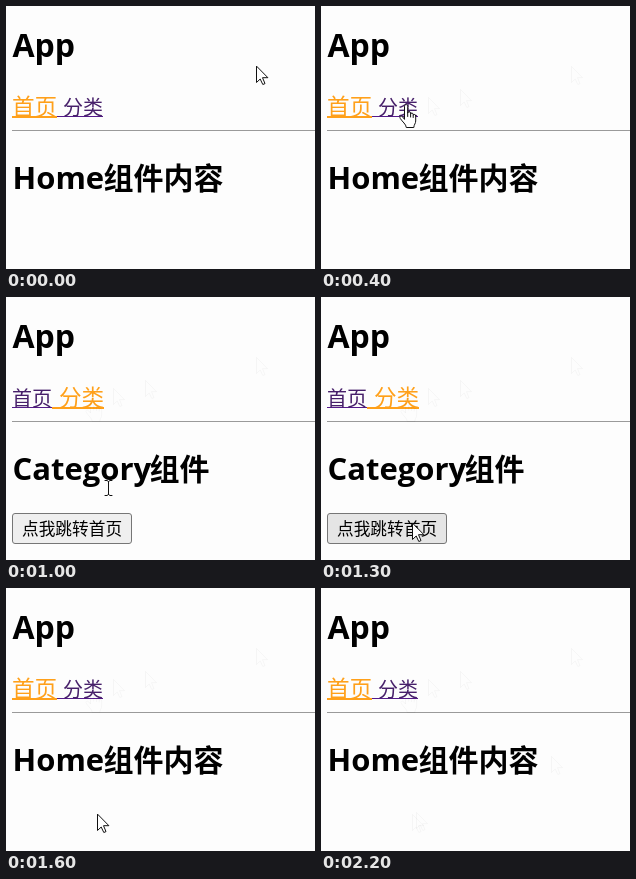
Animation of 309 by 263 pixels, one loop 2500 ms. Source, as an HTML page:

```html
<!DOCTYPE html>
<html lang="zh">
<head>
<meta charset="utf-8">
<style>
  html, body { margin: 0; width: 100%; height: 100%; overflow: hidden; background: #fdfdfd; }
  svg { display: block; }
  text { font-family: "Noto Sans CJK SC", "Noto Sans CJK", "Noto Sans CJK JP", sans-serif; }
  .latin { font: 700 31px "Open Sans", "Noto Sans", sans-serif; }
  .han { font-size: 30px; font-weight: 700; }
  .active { font-size: 22.6px; fill: #ffa01a; }
  .link { font-size: 20px; font-weight: 300; fill: #47206a; }
  .button { font-size: 16.7px; }
  .cursor { fill: #fff; stroke: #111; stroke-linejoin: round; stroke-linecap: round; }
  .trace { fill: none; stroke: #000; opacity: .03; }
  rect { shape-rendering: crispEdges; }
  #button { shape-rendering: auto; }
</style>
</head>
<body>
<svg width="309" height="263" viewBox="0 0 309 263">
  <defs>
    <path id="arrow" d="M.5 .5V16.5L4.2 13L6.8 18.5L9 17.6L6.5 11.7H11.5Z"/>
    <path id="hand" d="M5.5 15V2.2C5.5 .1 8.7 .1 8.7 2.2V9C8.9 7.2 11.6 7.4 11.6 9.2V10C11.9 8.5 14.2 8.8 14.2 10.5V11.2C14.8 10 16.7 10.3 16.7 12V17C16.7 19.5 15 20.5 14.8 23.5H7.3C7 20 3.5 18 1.3 14.5C0 12.5 2.2 11.2 3.6 12.8ZM8.7 9V12.5M11.6 10V13M14.2 11.2V13.5"/>
    <path id="beam" d="M-3 -7.5H-1L.5 -6.5L2 -7.5H4M.5 -6.5V6.5M-3 7.5H-1L.5 6.5L2 7.5H4"/>
  </defs>

  <text class="latin" x="6.5" y="51.3" style="font-size: 32px">App</text>
  <rect x="6" y="124" width="303" height="1" fill="#9a9a9a"/>

  <g id="home">
    <rect x="6" y="110" width="45" height="2" fill="#ffa01a"/>
    <rect x="51" y="110" width="46" height="1" fill="#551a8b"/>
    <text class="active" x="6" y="108.5">首页</text>
    <text class="link" x="57" y="108.5">分类</text>
    <text class="latin" x="6.5" y="183.3">Home</text>
    <text class="han" x="97.5" y="183.3">组件内容</text>
  </g>

  <g id="category">
    <rect x="6" y="110" width="40" height="1" fill="#551a8b"/>
    <rect x="46" y="110" width="52" height="2" fill="#ffa01a"/>
    <text class="link" x="6" y="108.5">首页</text>
    <text class="active" x="53" y="108.5">分类</text>
    <text class="latin" x="6.5" y="183.3">Category</text>
    <text class="han" x="143.5" y="183.3">组件</text>
    <rect id="button" x="6.5" y="216.5" width="119" height="30" rx="2.5" stroke="#767676"/>
    <text class="button" x="16" y="238">点我跳转首页</text>
  </g>

  <g id="traces"></g>
  <use id="cursor" class="cursor"/>
</svg>

<script>
const LOOP = 2500;
const $ = id => document.getElementById(id);

// Pointer stops: start time, shape, x, y
const stops = [
  [0, 'arrow', 250, 60], [100, 'arrow', 139, 83], [200, 'arrow', 107, 91],
  [300, 'hand', 80, 99], [400, 'hand', 78, 98],
  [700, 'hand', 80, 103], [800, 'arrow', 92, 135], [900, 'beam', 98, 165],
  [1000, 'beam', 102, 191], [1100, 'arrow', 97, 212],
  [1200, 'arrow', 93, 224], [1300, 'arrow', 91, 226],
  [1900, 'arrow', 95, 224], [2000, 'arrow', 230, 168],
  [2100, 'arrow', 284, 111], [2200, null, 0, 0]
];

// Faint marks left where the pointer has been: time, shape, x, y
const traces = [
  [100, 'arrow', 250, 60], [200, 'arrow', 139, 83], [300, 'arrow', 107, 91],
  [800, 'hand', 79, 101], [1900, 'arrow', 91, 226],
  [2000, 'arrow', 95, 224], [2100, 'arrow', 230, 168]
].map(([time, shape, x, y]) => {
  const node = document.createElementNS('http://www.w3.org/2000/svg', 'use');
  node.setAttribute('class', 'trace');
  place(node, shape, x, y);
  $('traces').append(node);
  return { time, node };
});

function place(node, shape, x, y) {
  node.setAttribute('href', '#' + shape);
  node.setAttribute('transform', `translate(${x} ${y})`);
}

function show(node, visible) {
  node.style.display = visible ? '' : 'none';
}

function draw(t) {
  const onCategory = t >= 600 && t < 1600;
  show($('home'), !onCategory);
  show($('category'), onCategory);
  $('button').setAttribute('fill', t >= 1500 ? '#f5f5f5' : t >= 1200 ? '#e5e5e5' : '#efefef');

  const [, shape, x, y] = stops.filter(s => s[0] <= t).pop();
  show($('cursor'), shape);
  if (shape) place($('cursor'), shape, x, y);
  traces.forEach(({ time, node }) => show(node, t >= time));
}

const start = performance.now();
function tick() {
  draw((performance.now() - start) % LOOP);
  requestAnimationFrame(tick);
}
tick();
</script>
</body>
</html>
```
